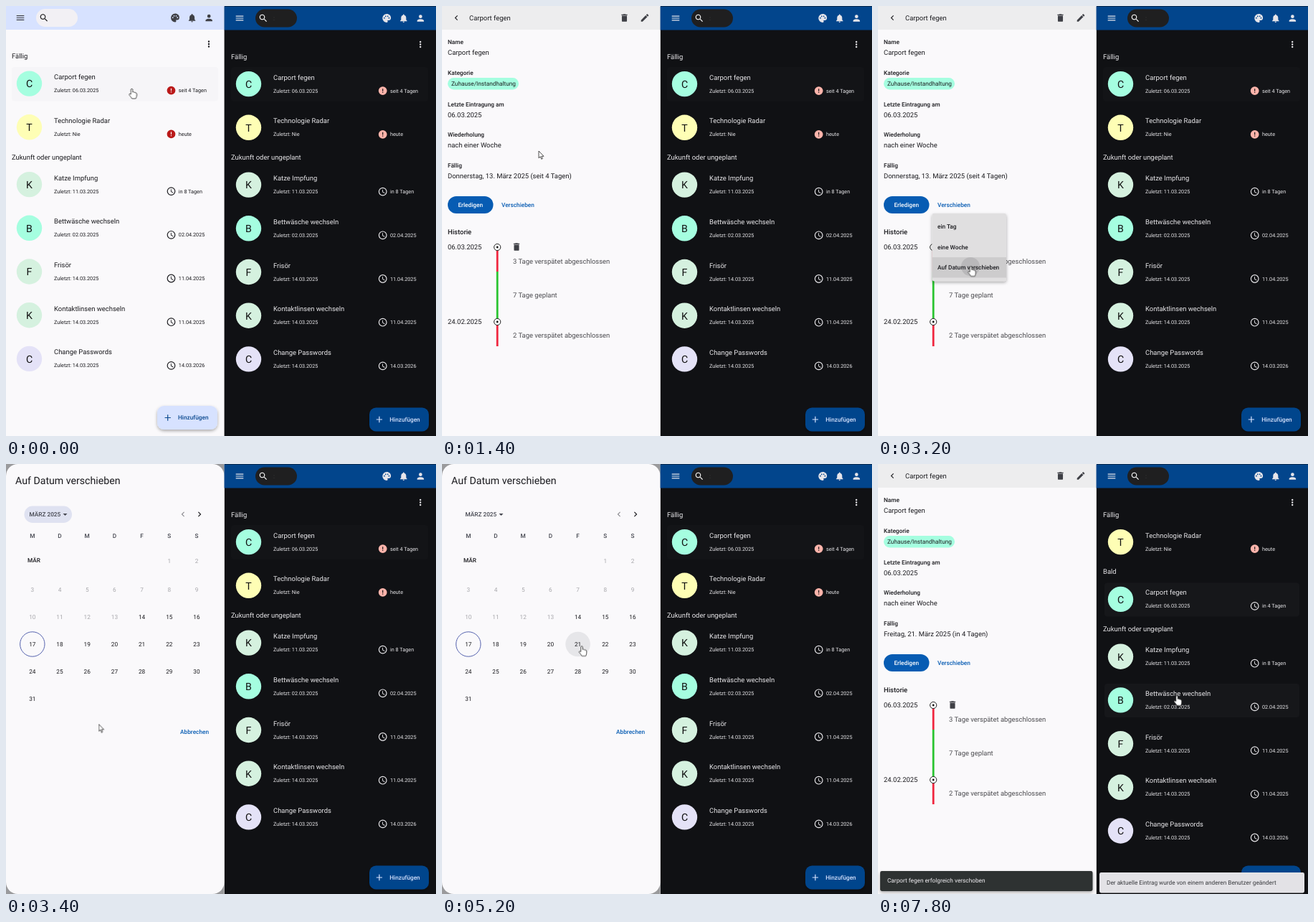
Write an HTML page that moves like this. It is 600 by 599 pixels and loops after 8000 ms.

```html
<!DOCTYPE html>
<html lang="de">
<head>
<meta charset="utf-8">
<style>
html, body { margin: 0; width: 100%; height: 100%; overflow: hidden; background: #101114; }
svg { display: block; width: 100vw; height: 100vh; font-family: Roboto, sans-serif; text-rendering: geometricPrecision; }
</style>
</head>
<body>
<svg id="stage" viewBox="0 0 600 599" preserveAspectRatio="none"></svg>
<script>
const LOOP = 8000;
const SPLIT = 304.6;
const BODY = 9.45, LABEL = 8.26, SMALL = 7.28, LARGE = 14.16;
const PAGE = '#faf9fb', INK = '#1b1b1f', BLUE = '#075cb3';

const ICONS = {
  menu: 'M3 18h18v-2H3zm0-5h18v-2H3zm0-7v2h18V6z',
  search: 'M15.5 14h-.8l-.3-.3A6.5 6.5 0 1 0 13.7 14.4l.3.3v.8l5 5 1.5-1.5zm-6 0a4.5 4.5 0 1 1 0-9 4.5 4.5 0 0 1 0 9z',
  palette: 'M12 2a10 10 0 0 0 0 20 2.5 2.5 0 0 0 1.9-4.2.5.5 0 0 1 .4-.8H16a6 6 0 0 0 6-6c0-5-4.5-9-10-9zM6.5 13a1.5 1.5 0 1 1 0-3 1.5 1.5 0 0 1 0 3zm3-4a1.5 1.5 0 1 1 0-3 1.5 1.5 0 0 1 0 3zm5 0a1.5 1.5 0 1 1 0-3 1.5 1.5 0 0 1 0 3zm3 4a1.5 1.5 0 1 1 0-3 1.5 1.5 0 0 1 0 3z',
  bell: 'M12 22a2 2 0 0 0 2-2h-4a2 2 0 0 0 2 2zm6-6v-5c0-3.1-1.6-5.6-4.5-6.3V4a1.5 1.5 0 0 0-3 0v.7C7.6 5.4 6 7.9 6 11v5l-2 2v1h16v-1z',
  person: 'M12 12a4 4 0 1 0 0-8 4 4 0 0 0 0 8zm0 2c-2.7 0-8 1.3-8 4v2h16v-2c0-2.7-5.3-4-8-4z',
  more: 'M12 8a2 2 0 1 0 0-4 2 2 0 0 0 0 4zm0 2a2 2 0 1 0 0 4 2 2 0 0 0 0-4zm0 6a2 2 0 1 0 0 4 2 2 0 0 0 0-4z',
  trash: 'M6 19a2 2 0 0 0 2 2h8a2 2 0 0 0 2-2V7H6zM19 4h-3.5l-1-1h-5l-1 1H5v2h14z',
  edit: 'M3 17.3V21h3.7L17.8 9.9l-3.7-3.7zM20.7 7a1 1 0 0 0 0-1.4l-2.3-2.3a1 1 0 0 0-1.4 0l-1.9 1.8 3.8 3.8z',
  left: 'M15.4 7.4 14 6l-6 6 6 6 1.4-1.4-4.6-4.6z',
  right: 'M8.6 16.6 13.2 12 8.6 7.4 10 6l6 6-6 6z',
  clock: 'M12 2a10 10 0 1 0 0 20 10 10 0 0 0 0-20zm0 18a8 8 0 1 1 0-16 8 8 0 0 1 0 16zm.5-13H11v6l5.2 3.2.8-1.3-4.5-2.7z',
  alert: 'M12 2a10 10 0 1 0 0 20 10 10 0 0 0 0-20zm1 15h-2v-2h2zm0-4h-2V7h2z',
  plus: 'M19 13h-6v6h-2v-6H5v-2h6V5h2v6h6z'
};

// All helpers place things by their vertical centre.
const text = (x, y, s, size = BODY, fill = INK, extra = '') =>
  `<text x="${x}" y="${y + size * .355}" font-size="${size}" fill="${fill}" ${extra}>${s}</text>`;
const MEDIUM = 'font-weight="500"', CENTER = 'text-anchor="middle"';
const icon = (name, x, y, fill) =>
  `<path d="${ICONS[name]}" fill="${fill}" fill-rule="evenodd" transform="translate(${x} ${y}) scale(.59) translate(-12 -12)"/>`;
const rect = (x, y, w, h, fill, r = 0, extra = '') =>
  `<rect x="${x}" y="${y}" width="${w}" height="${h}" rx="${r}" fill="${fill}" ${extra}/>`;
const circle = (x, y, r, fill, extra = '') => `<circle cx="${x}" cy="${y}" r="${r}" fill="${fill}" ${extra}/>`;
const group = (id, content) => `<g id="${id}">${content}</g>`;

const MINT = '#a5fee0', PALE = '#d5f1df';
const task = (name, last, due, color, late) => ({ name, last, due, color, late });
const carport = task('Carport fegen', '06.03.2025', 'seit 4 Tagen', MINT, true);
const radar = task('Technologie Radar', 'Nie', 'heute', '#fefeb5', true);
const future = [
  task('Katze Impfung', '11.03.2025', 'in 8 Tagen', PALE),
  task('Bettwäsche wechseln', '02.03.2025', '02.04.2025', MINT),
  task('Frisör', '14.03.2025', '11.04.2025', PALE),
  task('Kontaktlinsen wechseln', '14.03.2025', '11.04.2025', PALE),
  task('Change Passwords', '14.03.2025', '14.03.2026', '#e4e2f7')
];
const before = [['Fällig', [carport, radar]], ['Zukunft oder ungeplant', future]];
const after = [['Fällig', [radar]],
  ['Bald', [{ ...carport, due: 'in 4 Tagen', late: false }]],
  ['Zukunft oder ungeplant', future]];

const light = { x: 0, end: 0, y: 0, ink: INK, icon: '#3f4046', bar: '#d7e2ff', field: '#f2f0f4', alert: '#ba1a1a', fabInk: '#0a488f' };
const dark = { x: 306, end: 295.2, y: .5, ink: '#e8e7ea', icon: '#e6e5ea', bar: '#02458c', field: '#1f1f20', alert: '#ffb4ab', fabInk: '#d9e4ff' };

function taskList(sections, t) {
  let y = 69.8 + t.y, out = '';
  for (const [title, tasks] of sections) {
    out += text(8 + t.x, y, title, BODY, t.ink);
    y += 38.3;
    for (const k of tasks) {
      out += circle(32.5 + t.x, y, 17.7, k.color)
        + text(32.5 + t.x, y + .3, k.name[0], LARGE, '#111', CENTER)
        + text(67 + t.x, y - 9.3, k.name, BODY, t.ink)
        + text(67 + t.x, y + 9.5, 'Zuletzt: ' + k.last, SMALL, t.ink)
        + icon(k.late ? 'alert' : 'clock', 230.5 + t.end, y + 9.5, k.late ? t.alert : t.ink)
        + text(240.8 + t.end, y + 9.5, k.due, SMALL, t.ink);
      y += 60.7;
    }
    y += 41.5 - 60.7;
  }
  return out;
}

const appBar = t => rect(t.x ? SPLIT : 0, t.y, t.x ? 600 - SPLIT : SPLIT, 33, t.bar)
  + icon('menu', 20 + t.x, 16.5 + t.y, t.icon)
  + rect(42 + t.x, 4 + t.y, 58, 25, t.field, 12.5)
  + icon('search', 53 + t.x, 16.5 + t.y, t.x ? '#fff' : '#111')
  + ['palette', 'bell', 'person'].map((n, i) => icon(n, 236 + 23.6 * i + t.end, 16.5 + t.y, t.icon)).join('')
  + icon('more', 283 + t.end, 53 + t.y, t.ink);

const fab = t => {
  const y = t.x ? 576 : 573.5;
  return rect(t.x ? 507 : 211, y - 16.6, t.x ? 83 : 84, 33.2, t.bar, 9.4, 'filter="url(#shadow)"')
    + icon('plus', 225.7 + t.end, y, t.fabInk)
    + text(240 + t.end, y, 'Hinzufügen', LABEL, t.fabInk, MEDIUM);
};

const field = (y, label, value = '') => text(8, y, label, LABEL, INK, MEDIUM) + text(8, y + 14.4, value);

function detail() {
  const lines = [[336, 34, '#f0263f'], [370, 70, '#2ac430'], [440, 34, '#f0263f']];
  const dots = [336, 440];
  return rect(0, 0, SPLIT, 599, PAGE) + rect(0, 0, SPLIT, 33, '#ededee')
    + icon('left', 20, 16.5, INK) + text(38, 16.5, 'Carport fegen')
    + icon('trash', 254.5, 16.5, '#3f4046') + icon('edit', 283, 16.5, '#3f4046')
    + field(50.5, 'Name', 'Carport fegen') + field(93, 'Kategorie')
    + rect(8, 100, 99, 16.5, MINT, 8.2)
    + text(13, 108.2, 'Zuhause/Instandhaltung', LABEL)
    + field(137, 'Letzte Eintragung am', '06.03.2025')
    + field(179.3, 'Wiederholung', 'nach einer Woche')
    + field(221.8, 'Fällig')
    + group('dueOld', text(8, 236.2, 'Donnerstag, 13. März 2025 (seit 4 Tagen)'))
    + group('dueNew', text(8, 236.2, 'Freitag, 21. März 2025 (in 4 Tagen)'))
    + group('buttonHover', rect(75, 265, 63, 24, '#e4eaf5', 12))
    + rect(8, 265, 63.5, 24, BLUE, 12)
    + text(39.7, 276.8, 'Erledigen', LABEL, '#fff', MEDIUM + ' ' + CENTER)
    + text(83, 276.8, 'Verschieben', LABEL, BLUE, MEDIUM)
    + text(8, 314.5, 'Historie', BODY, INK, MEDIUM)
    + lines.map(([y, h, c]) => rect(75.8, y, 2.8, h, c)).join('')
    + dots.map(y => circle(77.2, y, 4.6, '#fff', 'stroke="#222"') + circle(77.2, y, 1.4, '#111')).join('')
    + text(8, 336, '06.03.2025') + text(8, 439.7, '24.02.2025')
    + icon('trash', 104, 335.5, '#3f4046')
    + text(99, 355.3, '3 Tage verspätet abgeschlossen', BODY, '#4c4c50')
    + text(99, 402.3, '7 Tage geplant', BODY, '#4c4c50')
    + text(99, 459, '2 Tage verspätet abgeschlossen', BODY, '#4c4c50');
}

const menu = () => rect(75.5, 289, 103.5, 94.2, '#e0dfe0', 2.4, 'filter="url(#shadow)"')
  + group('hoverWeek', rect(75.5, 321.5, 103.5, 28.5, '#cdcccd'))
  + group('hoverDate', rect(75.5, 350, 103.5, 28.5, '#cdcccd'))
  + group('ripple', circle(129, 363, 13, '#b9b8ba'))
  + ['ein Tag', 'eine Woche', 'Auf Datum verschieben']
    .map((s, i) => text(83, 307.3 + 28.4 * i, s, LABEL, INK, MEDIUM)).join('');

function dialog() {
  const column = i => 36.8 + 38.2 * i;
  const row = i => i ? 251 + 38.2 * (i - 3) : 135;
  let days = '';
  for (let d = 1; d <= 31; d++)
    days += text(column((d + 4) % 7), row(Math.floor((d + 4) / 7)), d, LABEL, d < 14 ? '#a7a7ab' : INK, CENTER);
  return rect(0, 0, SPLIT, 599, '#9a9a9c') + rect(0, 0, SPLIT, 599, PAGE, 16.5)
    + text(13, 22.5, 'Auf Datum verschieben', LARGE)
    + group('monthFocus', rect(25.5, 58.5, 66.5, 23.5, '#dfe2f1', 11.7))
    + text(32.5, 70, 'MÄRZ 2025', LABEL, '#44464f', MEDIUM)
    + '<path d="M79.5 69h6l-3 3z" fill="#44464f"/>'
    + icon('left', 247, 70, '#8d8d92') + icon('right', 270, 70, INK)
    + [...'MDMDFSS'].map((s, i) => text(column(i), 100, s, LABEL, '#44464f', MEDIUM + ' ' + CENTER)).join('')
    + text(30, 134, 'MÄR', LABEL, INK, MEDIUM)
    + group('hover26', circle(column(2), row(4), 17.3, '#e6e6e9'))
    + group('hover21', circle(column(4), row(3), 17.3, '#e6e6e9'))
    + circle(column(0), row(3), 17.2, 'none', 'stroke="#5461ad"')
    + days
    + text(283, 372.7, 'Abbrechen', LABEL, BLUE, MEDIUM + ' text-anchor="end"');
}

const ARROW = 'M0 0v9.8l2.2-2 1.6 3.5 1.5-.7-1.5-3.3H7z';
const HAND = 'M-1.2 8V1Q0-1 1.3 1V5Q2.6 4 3.3 5.3 4.7 4.5 5.2 6 6.7 5.6 6.8 7.4V10.2Q6.7 11.8 5.6 14H.2Q-1.2 11.5-4 8.4-3.4 6.2-1.2 8z';
const pointer = d => `<path d="${d}" fill="#fff" stroke="#222" stroke-width=".8" stroke-linejoin="round"/>`;

document.getElementById('stage').innerHTML =
  `<defs><filter id="shadow" x="-20%" y="-30%" width="140%" height="180%">
    <feDropShadow dx="0" dy="2" stdDeviation="2" flood-opacity=".32"/></filter></defs>`
  + rect(0, 0, 600, 599, '#101114') + rect(0, 0, SPLIT, 599, PAGE)
  + group('list', rect(8, 85, 288, 47.5, '#f6f5f8', 4)
    + group('rowRipple', rect(8, 85, 288, 47.5, '#e9e8ec', 4))
    + appBar(light) + taskList(before, light) + fab(light))
  + group('detail', detail())
  + group('menu', menu())
  + group('dialog', dialog())
  + appBar(dark) + text(373, 17, ':', LABEL, '#4a4a4c') + fab(dark)
  + group('rightBefore', rect(314, 85, 275, 48, '#131417', 4) + taskList(before, dark))
  + group('rightAfter', rect(316, 165.5, 272, 47, '#16171a', 4)
    + group('rowHover', rect(316, 306, 272, 47, '#16171a', 4)) + taskList(after, dark))
  + group('toasts', rect(3, 567, 296.5, 28, '#2f3033', 2.4, 'filter="url(#shadow)"')
    + text(13, 580.5, 'Carport fegen erfolgreich verschoben', LABEL, '#f2f0f4')
    + rect(309, 569, 286, 28.5, '#e3e2e6', 2.4)
    + text(319, 583.3, 'Der aktuelle Eintrag wurde von einem anderen Benutzer geändert', LABEL, '#38393d'))
  + group('cursor', group('arrow', pointer(ARROW)) + group('hand', pointer(HAND)));

// Holds each value until the next entry: [time, value], ...
function hold(id, property, steps) {
  const frames = steps.map(([t, v]) => ({ offset: t / LOOP, [property]: v, easing: 'steps(1, end)' }));
  frames.push({ offset: 1, [property]: steps.at(-1)[1] });
  document.getElementById(id).animate(frames, { duration: LOOP, iterations: Infinity });
}

// Visible during each [from, to) span.
function show(id, ...spans) {
  const steps = spans[0][0] ? [[0, 0]] : [];
  for (const [from, to] of spans) {
    steps.push([from, 1]);
    if (to < LOOP) steps.push([to, 0]);
  }
  hold(id, 'opacity', steps);
}

show('list', [0, 600]);
show('rowRipple', [200, 600]);
show('detail', [600, LOOP]);
show('dueOld', [0, 6000]);
show('dueNew', [6000, LOOP]);
show('buttonHover', [1800, 2600]);
show('menu', [2400, 3400]);
show('hoverWeek', [2800, 3000]);
show('hoverDate', [3000, 3400]);
show('ripple', [3200, 3400]);
show('dialog', [3400, 6000]);
show('monthFocus', [3400, 4200]);
show('hover26', [4200, 4600]);
show('hover21', [4800, 6000]);
show('rightBefore', [0, 6000]);
show('rightAfter', [6000, LOOP]);
show('rowHover', [7200, LOOP]);
show('toasts', [6000, LOOP]);

show('hand', [0, 600], [1800, 3400], [4200, 6000], [7200, LOOP]);
show('arrow', [600, 1800], [3400, 4200], [6000, 7200]);
hold('cursor', 'transform', [
  [0, 175.5, 115], [800, 162, 145], [1000, 142, 190], [1400, 135, 202], [1600, 118, 245],
  [1800, 106, 273], [2600, 110, 300], [2800, 120, 334], [3000, 129.5, 362.5], [3800, 128, 352],
  [4000, 122, 320], [4200, 116, 292], [4600, 150, 272], [4800, 185, 258], [5000, 195, 253.5],
  [6600, 225, 265], [6800, 275, 284], [7000, 330, 302], [7200, 380, 315], [7400, 405, 320], [7600, 417, 322.5]
].map(([t, x, y]) => [t, `translate(${x}px, ${y}px)`]));
</script>
</body>
</html>
```
